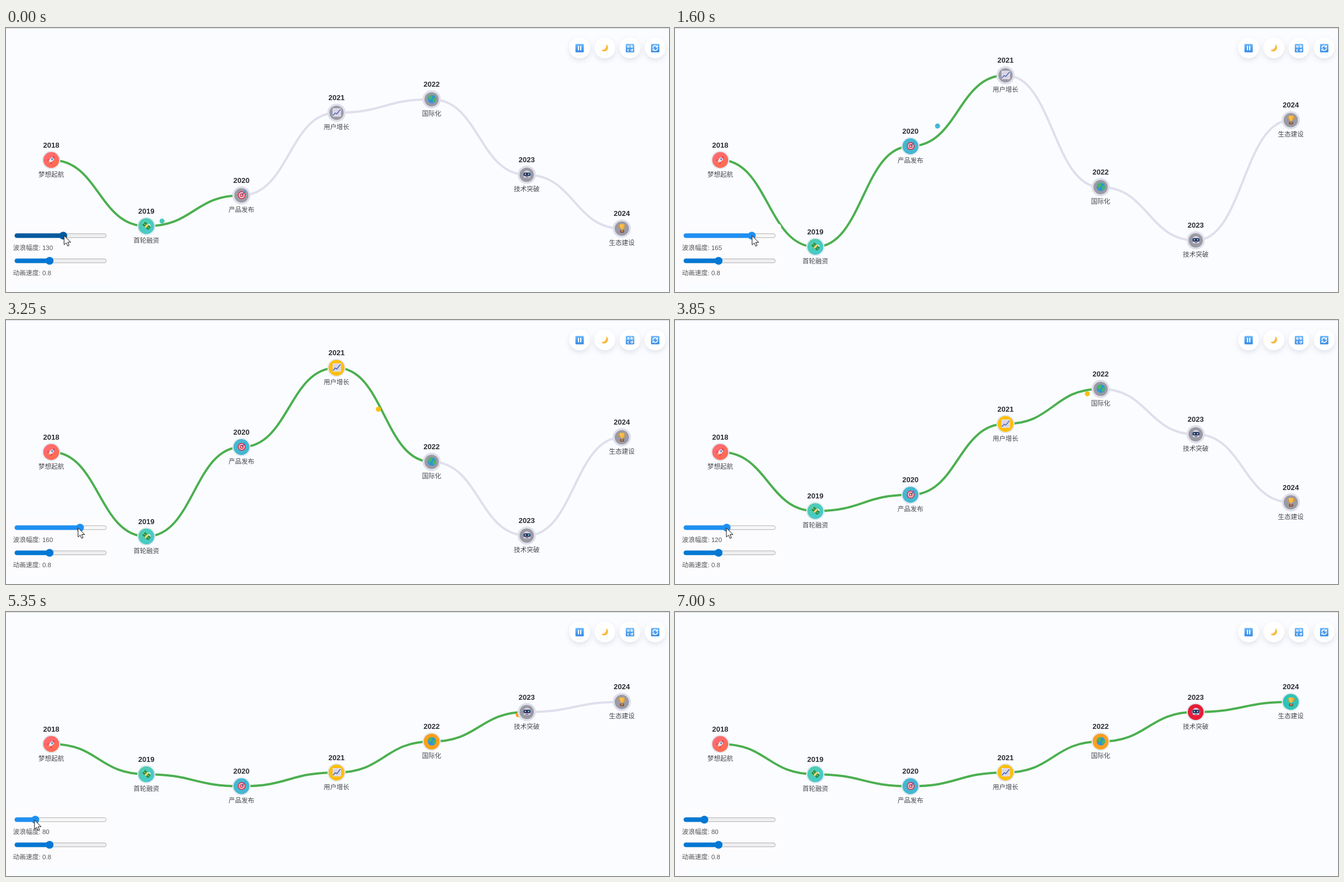
An HTML page for the animation above (8300 ms loop, 1187 px wide and 472 px high).

```html
<!DOCTYPE html>
<html lang="zh-CN">
<head>
<meta charset="utf-8">
<title>时间轴</title>
<style>
html, body { margin: 0; width: 100%; height: 100%; overflow: hidden; background: #fafcff; }
svg { display: block; width: 1187px; height: 472px; }
text { font-family: "Liberation Sans", Arial, "Noto Sans CJK SC", "Noto Sans CJK", sans-serif; font-size: 11.5px; }
.year { font-size: 13px; font-weight: bold; fill: #2d2d33; text-anchor: middle; }
.name { fill: #48484c; text-anchor: middle; }
.panel text { fill: #555; }
.seg { fill: none; stroke: #dfdfec; stroke-width: 4; }
.seg.on { stroke: #4caf50; }
.halo { fill: #dfdfeb; }
.on .halo { fill: #dfe7ee; }
.disc { fill: #9a9aa3; }
.btn { filter: drop-shadow(0 4px 5px rgba(60, 60, 100, .13)); }
</style>
</head>
<body>
<svg viewBox="0 0 1187 472">
  <defs>
    <linearGradient id="blue" x2="0" y2="1"><stop stop-color="#6db9fb"/><stop offset="1" stop-color="#3488e4"/></linearGradient>
    <linearGradient id="coral" x2="1" y2="1"><stop stop-color="#ff6b7d"/><stop offset="1" stop-color="#ff6a45"/></linearGradient>
    <linearGradient id="mint" x2="1" y2="1"><stop stop-color="#4ecda8"/><stop offset="1" stop-color="#46c9d2"/></linearGradient>
  </defs>
  <rect width="1187" height="472" fill="#fafcff"/>
  <rect width="1187" height="1" fill="#d3d3dd"/>
  <g id="lines"></g>
  <circle id="dot" r="4.5"/>
  <g id="nodes"></g>
  <g id="buttons"></g>
  <g class="panel">
    <rect y="350" width="190" height="109" rx="6" fill="#fcfcff"/>
    <g id="sliders"></g>
    <text id="ampText" x="12.5" y="397"></text>
    <text x="12.5" y="442">动画速度: 0.8</text>
  </g>
  <path id="cursor" d="M0 0V16.5L3.8 13L6.4 18.8L9 17.6L6.5 12H11.8Z" fill="#fff" stroke="#111" stroke-width="1"/>
</svg>
<script>
const $ = id => document.getElementById(id);
const NS = "http://www.w3.org/2000/svg";
const set = (el, attrs) => { for (const k in attrs) el.setAttribute(k, attrs[k]); return el; };
const add = (parent, tag, attrs = {}, html = "") => {
  const el = set(document.createElementNS(NS, tag), attrs);
  el.innerHTML = html;
  return parent.appendChild(el);
};

// Icons are drawn around (0, 0) in a box of about 16 px.
const rocket = `<g transform="rotate(45)">
  <path d="M-3 2L-5.5 6.5L-2 5ZM3 2L5.5 6.5L2 5Z" fill="#c93a50"/>
  <path d="M0-8.5C3.5-5 3.6 1 2.2 5H-2.2C-3.6 1-3.5-5 0-8.5Z" fill="#e6e3ee"/>
  <path d="M0-8.5C1.5-7 2.3-5.6 2.6-4.4H-2.6C-2.3-5.6-1.5-7 0-8.5Z" fill="#d8405c"/>
  <circle cy="-1.5" r="1.6" fill="#4a82b8"/><path d="M-1.5 5H1.5L0 8Z" fill="#ffb02e"/></g>`;
const money = `<path d="M-7-2C-7-6-4-7-1-5L1-1L-3 2ZM7 2C8-2 5-5 2-3Z" fill="#e8eef0"/>
  <g transform="rotate(42)"><rect x="-7" y="-3.7" width="14" height="7.4" rx="1" fill="#218a43"/>
  <rect x="-1.8" y="-3.7" width="3.6" height="7.4" fill="#f3d36b"/>
  <circle cx="-4.3" r="1.3" fill="#75c85b"/><circle cx="4.3" r="1.3" fill="#75c85b"/></g>`;
const target = `<circle r="7" fill="#d73550"/><circle r="5.2" fill="#f4eef2"/><circle r="3.6" fill="#d73550"/>
  <circle r="1.8" fill="#f4eef2"/><path d="M0 0L5-5" stroke="#3d5a90" stroke-width="1.4"/>
  <path d="M4-4.5V-7L6.5-8.5V-6H8.5L6.5-4Z" fill="#3f9be6"/>`;
const chart = `<rect x="-7.5" y="-7.5" width="15" height="15" rx="1" fill="#e5e0ef"/>
  <path d="M-7-3.5H7M-7 0H7M-7 3.5H7M-3.5-7V7M0-7V7M3.5-7V7" stroke="#c4bfd8" stroke-width=".7"/>
  <path d="M-7 5.5L-3 1L0 2.5L6.5-5.5" fill="none" stroke="#4468b4" stroke-width="1.5"/>`;
const globe = `<circle r="7.5" fill="#2f92dc"/>
  <path d="M-6.5-3.5C-4-8 0-8 2-6.5L0-3.5L1-1L-2 0L-3 3L-6-.5ZM3-2L7-2.5C8 1 6 5 3 6L1 2.5Z" fill="#45b866"/>`;
const robot = `<path d="M-5.8-2C-5.8-8.5 5.8-8.5 5.8-2V4.5C5.8 6.5-5.8 6.5-5.8 4.5Z" fill="#d9d4e8"/>
  <rect x="-7.5" y="-2" width="15" height="4.5" rx="1" fill="#8a91bd"/>
  <rect x="-6" y="-3.5" width="12" height="6" rx="2" fill="#29294d"/>
  <circle cx="-2.8" cy="-.5" r="1.4" fill="#72d9f5"/><circle cx="2.8" cy="-.5" r="1.4" fill="#72d9f5"/>
  <rect x="-2.5" y="3.7" width="5" height="1.2" fill="#4a476d"/>`;
const trophy = `<path d="M-3-5.5H-6C-6-1-4 0-2 0M3-5.5H6C6-1 4 0 2 0" fill="none" stroke="#e39a30" stroke-width="1.3"/>
  <path d="M-4-7.5H4C4-1 2.5 1 .9 1.5V4H-.9V1.5C-2.5 1-4-1-4-7.5Z" fill="#f9b83d"/>
  <path d="M-2-6.5V-2" stroke="#ffe08b" stroke-width="1"/><rect x="-3.5" y="3.5" width="7" height="4.5" rx=".7" fill="#7b4a45"/>
  <rect x="-1.7" y="4.7" width="3.4" height="1.5" fill="#f1bd5a"/>`;

const steps = [
  ["梦想起航", "#ff6b6b", rocket, "url(#coral)"], ["首轮融资", "#46c8b8", money, "url(#mint)"],
  ["产品发布", "#45b7d1", target], ["用户增长", "#ffbe0b", chart],
  ["国际化", "#ff9f1c", globe], ["技术突破", "#e71d36", robot], ["生态建设", "#2ec4b6", trophy]
].map(([name, color, icon, fill = color], i) => {
  const g = add($("nodes"), "g");
  add(g, "circle", { class: "halo", r: 16.3 });
  const disc = add(g, "circle", { class: "disc" });
  add(g, "g", { transform: "translate(.5 -.5)" }, icon);
  add(g, "text", { class: "year", y: -22.3 }, 2018 + i);
  add(g, "text", { class: "name", y: 29.7 }, name);
  return { x: 81 + i * 170.25, color, fill, g, disc, seg: i && add($("lines"), "path", { class: "seg" }) };
});

const tile = `<rect x="-7.5" y="-7.5" width="15" height="15" rx="1.5" fill="url(#blue)"/>`;
[
  tile + `<path d="M-2-4V4M2-4V4" stroke="#fff" stroke-width="2"/>`,
  `<path d="M2.5-7A7 7 0 1 1-6.5 3.5C-.5 4 4-1 2.5-7Z" fill="#f8b83c"/>`,
  tile + `<g fill="none" stroke="#fff" stroke-width="1.2"><circle cx="-3.2" cy="-2.8" r="1.5"/><path d="M-1.5-4.5V-1"/>
    <circle cx="3.5" cy="-2.8" r="1.5"/><path d="M1.9-6V-1"/><path d="M-1.8 2.5A1.6 1.6 0 1 0-1.8 5"/>
    <circle cx="3" cy="3.8" r="1.5"/><path d="M4.7 1V5.5"/></g>`,
  tile + `<g fill="none" stroke="#fff" stroke-width="1.6"><path d="M-4.2 0A4.2 4.2 0 0 1 3-3M4.2 0A4.2 4.2 0 0 1-3 3"/></g>
    <path d="M4.8-5.5V-1H.8ZM-4.8 5.5V1H-.8Z" fill="#fff"/>`
].forEach((icon, i) => {
  const g = add($("buttons"), "g", { transform: `translate(${1027 + i * 45.1} 35.5)` });
  add(g, "circle", { class: "btn", r: 18.8, fill: "#fff" });
  add(g, "g", { transform: "translate(0 .5)" }, icon);
});

function slider(y) {
  const track = add($("sliders"), "rect", { x: 16, y: y - 3.5, width: 163.5, height: 7, rx: 3.5, fill: "#efefef", stroke: "#b0b0b4" });
  const bar = add($("sliders"), "rect", { x: 15.5, y: y - 4, height: 8, rx: 4 });
  const thumb = add($("sliders"), "circle", { cy: y, r: 7 });
  return (x, color, back) => {
    set(track, { fill: back });
    set(bar, { width: x - 15.5, fill: color });
    set(thumb, { cx: x, fill: color });
  };
}
const ampSlider = slider(371.3), speedSlider = slider(416.3);
speedSlider(78, "#0078d4", "#efefef");

// Linear track through [time, value] pairs.
function track(keys, t) {
  const i = keys.findIndex(k => k[0] > t);
  if (i < 0) return keys[keys.length - 1][1];
  if (!i) return keys[0][1];
  const [t0, a] = keys[i - 1], [t1, b] = keys[i];
  return a + (b - a) * (t - t0) / (t1 - t0);
}
const ampKeys = [[500, 130], [1000, 141], [1700, 167], [2350, 191], [2480, 195], [2620, 195], [3250, 160], [3400, 155], [3850, 120], [4250, 106], [4950, 80]];
const curX = [[0, 104], [500, 106], [1000, 120], [1700, 141], [2350, 162], [2520, 166], [2640, 165], [3250, 129], [3850, 92], [4250, 78], [4950, 51], [6150, 51], [6600, 62]];
const curY = [[0, 371], [6150, 372], [6600, 474]];
const PRESS = 350, RELEASE = 6050, LEAVE = 6200;

function draw(t) {
  const amp = Math.round(track(ampKeys, t) / 5) * 5;
  const p = 1.165 + 0.0007 * t;
  steps.forEach((s, i) => {
    s.y = 236 + 0.944 * amp * Math.sin(i * amp / 100);
    const on = p >= i;
    set(s.g, { transform: `translate(${s.x} ${s.y})`, class: on ? "on" : "" });
    set(s.disc, { r: on ? 14.2 : 12.7 });
    s.disc.style.fill = on ? s.fill : "";
    if (!i) return;
    const a = steps[i - 1], mid = (a.x + s.x) / 2;
    set(s.seg, {
      d: `M${a.x} ${a.y}C${mid} ${a.y} ${mid} ${s.y} ${s.x} ${s.y}`,
      class: p >= i - 1 ? "seg on" : "seg"
    });
  });

  const k = Math.floor(p), a = steps[k], b = steps[k + 1];
  $("dot").style.display = b ? "" : "none";
  if (b) set($("dot"), { cx: a.x + (b.x - a.x) * (p - k), cy: a.y + (b.y - a.y) * (p - k), fill: a.color });

  const held = t >= PRESS && t < RELEASE;
  ampSlider(amp - 27.5, held ? "#1e90f2" : t < LEAVE ? "#005a9e" : "#0078d4", held ? "#f8f8f8" : "#efefef");
  $("ampText").textContent = "波浪幅度: " + amp;
  set($("cursor"), { transform: `translate(${track(curX, t)} ${track(curY, t)})` });
}

const start = performance.now();
function tick() {
  const t = Math.max(0, performance.now() - start) % 8300;
  draw(Math.min(7000, Math.floor(t / 50) * 50));
  requestAnimationFrame(tick);
}
tick();
</script>
</body>
</html>
```
